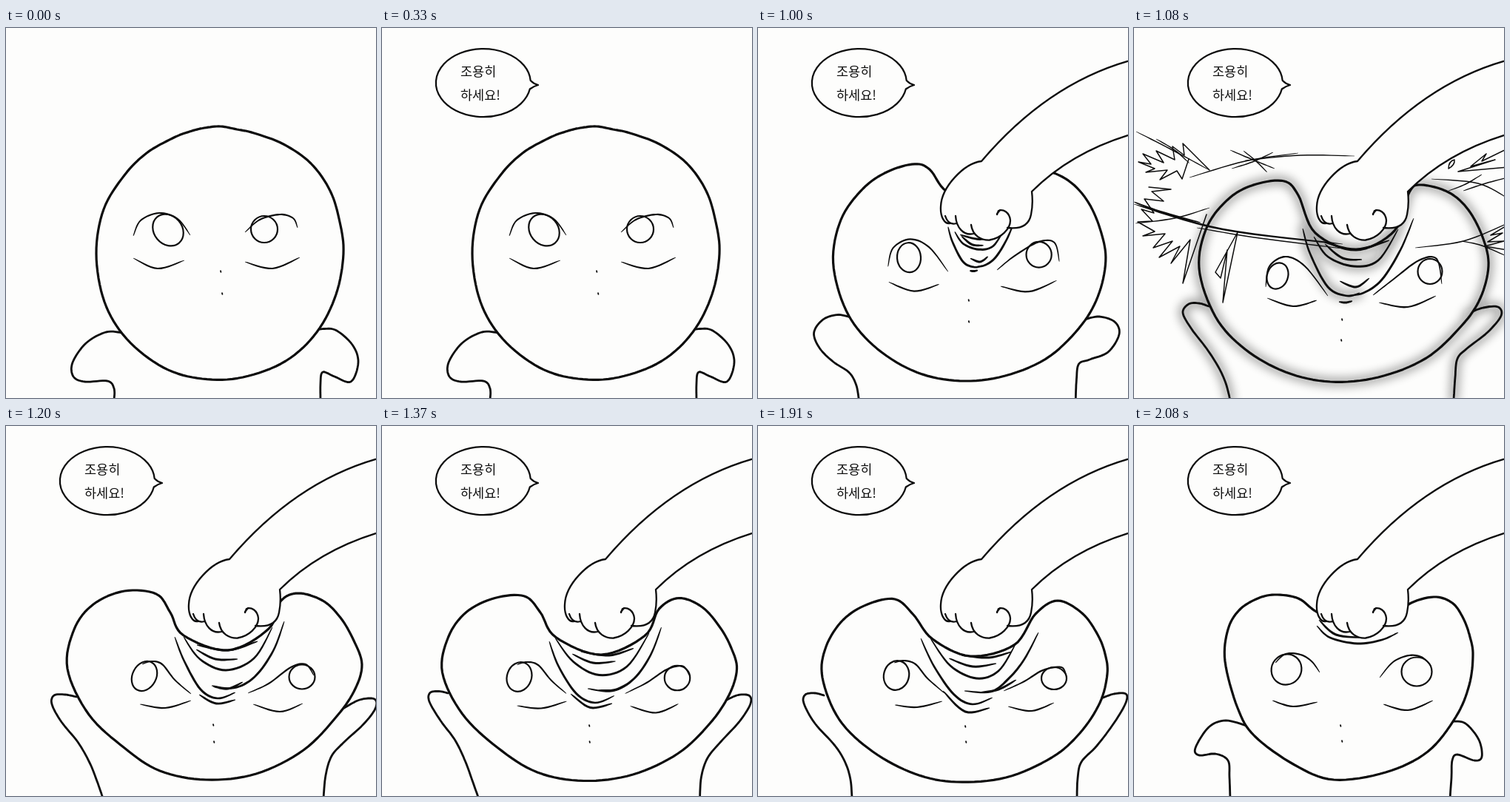
Recreate the animation shown at these times as an HTML page. Size 500x500 px, loop 3 s.

```html
<!DOCTYPE html>
<html lang="ko">
<head>
<meta charset="utf-8">
<style>
  html, body { margin: 0; width: 100%; height: 100%; overflow: hidden; background: #fdfdfc; }
  svg { display: block; width: 100vw; height: 100vh; }
  text { font: 500 17.5px "Noto Sans CJK KR", "Noto Sans CJK", "Noto Sans CJK JP", sans-serif; fill: #111; }
</style>
</head>
<body>
<svg id="stage" viewBox="0 0 500 500"></svg>
<script>
const INK = '#0d0d0d', PAPER = '#fdfdfc', LOOP = 3000;
const stage = document.getElementById('stage');

// Each part lists its guide points in six poses.
const POSES = ['rest', 'hit', 'sag', 'low', 'lift', 'end'];
const hidden = n => Array(n).fill('300,265').join(' ');

const PARTS = {
  head: [
    '225,149 248,140 268,135 290,133 312,137 335,142 375,157 412,183 438,220 451,262 456,305 446,360 420,411 378,450 320,472 265,474 213,459 163,420 133,370 122,305 132,245 160,199 190,169',
    '203,207 222,226 245,277 300,300 352,274 372,222 388,212 425,222 452,246 472,285 479,322 468,365 443,402 395,446 330,472 265,478 205,465 150,434 110,390 88,325 99,268 130,229 165,211',
    '203,227 222,252 240,283 300,303 355,274 371,237 395,226 428,236 452,259 470,290 481,322 472,355 448,391 402,438 338,470 270,478 208,466 160,435 112,390 83,328 92,275 118,241 160,223',
    '182,233 206,252 230,288 292,315 355,293 378,257 408,239 438,254 462,286 474,310 478,335 466,372 438,413 398,447 340,472 275,481 212,470 152,434 105,388 80,338 87,296 110,262 145,242',
    '185,234 210,255 236,288 287,311 346,296 375,254 405,236 438,253 459,282 469,308 472,335 462,374 435,415 397,448 335,475 268,481 212,470 155,440 110,397 87,340 92,298 115,262 148,241',
    '190,228 222,233 248,252 300,278 350,264 371,241 405,231 430,239 445,260 454,285 458,310 453,350 435,393 397,440 340,468 270,478 217,458 163,419 140,381 123,318 127,275 142,249 165,234'
  ],
  armL: [
    '158,412 135,411 108,426 90,452 91,471 107,478 137,477 146,487 146,503',
    '101,376 88,372 74,373 66,385 78,407 98,433 114,458 124,480 130,503',
    '95,366 80,363 65,364 62,376 75,400 97,427 113,455 123,480 131,503',
    '83,356 74,354 65,357 66,369 83,396 101,423 112,451 121,478 130,503',
    '89,364 77,361 64,363 62,375 77,402 104,432 118,455 125,478 127,503',
    '152,405 124,398 101,407 83,435 88,445 110,443 127,452 129,475 130,503'
  ],
  armR: [
    '424,407 445,408 468,428 476,452 466,478 444,471 428,465 425,480 425,503',
    '450,386 472,378 492,377 496,389 478,411 450,433 437,447 434,472 432,503',
    '457,381 478,370 498,369 499,382 483,403 457,427 440,446 432,472 429,503',
    '473,360 485,357 495,360 496,371 482,397 459,426 440,451 431,476 430,503',
    '464,368 481,362 497,362 497,374 482,400 458,432 437,454 432,476 431,503',
    '430,399 448,402 466,424 470,447 460,452 437,444 430,452 429,475 427,503'
  ],
  lidL: [
    '172,281 182,260 207,250 232,258 249,280',
    '178,350 183,322 205,309 231,322 262,362',
    '184,322 196,318 211,322 228,343 250,362',
    '181,323 195,320 211,324 229,344 248,361',
    '184,320 197,317 213,322 229,341 252,361',
    '191,320 205,308 225,309 240,318 251,333'
  ],
  lidR: [
    '323,276 343,259 370,252 388,257 394,270',
    '323,361 350,340 385,314 409,312 416,346',
    '327,361 355,348 385,326 405,322 416,337',
    '330,362 360,346 385,332 408,327 415,338',
    '332,358 360,345 385,330 410,326 417,339',
    '332,340 350,319 372,310 390,313 402,325'
  ],
  bagL: ['172,311 205,325 241,314', '180,365 215,376 247,368', '181,376 215,381 250,371',
    '184,380 215,382 249,373', '185,377 215,380 249,372', '187,371 215,379 248,373'],
  bagR: ['323,316 360,325 397,310', '331,371 370,377 408,362', '334,376 370,386 401,375',
    '337,381 370,389 400,376', '338,379 370,385 400,374', '337,376 370,384 404,371'],
  // cx, cy, rx, ry, tilt
  pupilL: ['219,273,19,23,-40', '194,335,14,18,20', '187,338,16,21,28',
    '184,340,17,19.5,12', '187,337,17,20,15', '206,329,20,21,40'],
  pupilR: ['349,272,18,18,0', '400,329,16.5,17,0', '400,339,17.5,16.5,0',
    '398,342,17,17,0', '400,341,17,15,0', '382,332,20.5,19.5,0'],
  dots: ['290,329 292,359', '281,394 280,422', '280,404 281,427',
    '280,406 280,427', '280,406 281,427', '279,405 281,426'],
  foldL: [hidden(5), '228,271 238,305 262,350 288,362 305,358', '228,285 241,318 263,356 286,368 310,360',
    '224,297 236,331 262,367 290,380 318,369', '220,287 238,325 265,363 290,376 317,367', hidden(5)],
  foldR: [hidden(5), '378,257 360,300 335,340 310,358 285,362', '376,264 361,304 336,339 308,354 278,351',
    '379,280 365,315 345,344 315,362 278,359', '379,279 360,315 340,340 315,359 279,358', hidden(5)],
  foldMid: [hidden(5), '243,282 262,309 297,322 330,314 357,272', '240,285 262,315 297,330 335,314 360,272',
    '228,288 255,322 290,343 327,336 362,288', '233,287 260,324 295,341 325,331 348,295',
    '247,270 265,286 302,294 335,289 357,279'],
  foldTop: [hidden(3), '258,292 282,311 308,313', '257,302 283,315 313,315',
    '257,314 287,325 318,321', '258,314 290,325 322,321', '250,262 273,282 312,286'],
  foldRim: [hidden(3), '255,289 300,299 345,287', '258,296 300,303 340,291',
    '280,314 314,317 340,310', '275,310 312,313 343,305', hidden(3)],
  foldSide: [hidden(3), '278,342 300,350 318,338', '280,352 300,355 320,346',
    '305,362 330,358 352,346', '300,360 325,356 349,343', hidden(3)],
  foldLow: [hidden(3), '277,370 286,371 295,369', '261,363 284,375 310,370',
    '249,361 279,386 312,380', '250,358 280,386 313,381', hidden(3)]
};
const nums = s => s.split(/[ ,]+/).map(Number);
for (const key in PARTS) PARTS[key] = PARTS[key].map(nums);

// start, pose, next pose, blend, fist drop (null = absent), impact strength
const STEPS = [
  [0, 'rest', 'rest', 0, null, 0],
  [330, 'rest', 'rest', 0, null, 0],
  [910, 'rest', 'rest', 0, 0, 0],
  [950, 'rest', 'rest', 0, 95, 0],
  [990, 'rest', 'hit', 0.6, 190, 0],
  [1040, 'rest', 'hit', 0.92, 190, 0.8],
  [1080, 'hit', 'hit', 0, 190, 1],
  [1120, 'hit', 'sag', 0.4, 190, 0.6],
  [1160, 'hit', 'sag', 0.75, 190, 0.25],
  [1200, 'sag', 'sag', 0, 190, 0],
  [1290, 'sag', 'low', 0.25, 190, 0],
  [1370, 'sag', 'low', 0.5, 190, 0],
  [1540, 'low', 'low', 0, 190, 0],
  [1910, 'lift', 'lift', 0, 190, 0],
  [1950, 'lift', 'end', 0.2, 190, 0],
  [1990, 'lift', 'end', 0.5, 190, 0],
  [2040, 'lift', 'end', 0.8, 190, 0],
  [2080, 'end', 'end', 0, 190, 0]
];

const pairs = a => a.reduce((out, v, i) => (i % 2 ? out[out.length - 1].push(v) : out.push([v]), out), []);

function spline(points, closed) {
  const n = points.length, out = [];
  const at = i => closed ? points[(i + n) % n] : points[Math.max(0, Math.min(n - 1, i))];
  const spans = closed ? n : n - 1;
  for (let i = 0; i < spans; i++) {
    const [a, b, c, d] = [at(i - 1), at(i), at(i + 1), at(i + 2)];
    for (let s = 0; s < 8; s++) {
      const u = s / 8;
      out.push([0, 1].map(k => b[k] + u * (c[k] - a[k]) / 2
        + u * u * (a[k] - 2.5 * b[k] + 2 * c[k] - d[k] / 2)
        + u * u * u * (1.5 * (b[k] - c[k]) + (d[k] - a[k]) / 2)));
    }
  }
  if (!closed) out.push(points[n - 1]);
  return out;
}

const trace = (pts, closed) => 'M' + pts.map(p => p.map(v => v.toFixed(1)).join(' ')).join('L') + (closed ? 'Z' : '');
const line = (d, width, fill = 'none') =>
  `<path d="${d}" fill="${fill}" stroke="${INK}" stroke-width="${width}" stroke-linecap="round" stroke-linejoin="round"/>`;

// A curve that thins out at both ends.
function brush(flat, width) {
  const pts = spline(pairs(flat)), last = pts.length - 1;
  const left = [], right = [];
  pts.forEach(([x, y], i) => {
    const p = pts[Math.max(0, i - 1)], q = pts[Math.min(last, i + 1)];
    const dx = q[0] - p[0], dy = q[1] - p[1], len = Math.hypot(dx, dy) || 1;
    const h = len < 1e-6 ? 0 : width / 2 * (0.25 + 0.75 * Math.sqrt(Math.sin(Math.PI * i / last) + 1e-9));
    left.push([x - dy / len * h, y + dx / len * h]);
    right.unshift([x + dy / len * h, y - dx / len * h]);
  });
  return `<path d="${trace(left.concat(right), true)}" fill="${INK}"/>`;
}
const strokes = (list, width) => list.map(s => brush(nums(s), width)).join('');
const scribbles = list => list.map(s => line('M' + s, 1.5)).join('');

const BUBBLE = line('M200.7 71A64 46 0 1 0 199.8 82.5Q204 79 211 77Q205 75.5 200.7 71Z', 2.3, PAPER)
  + '<text x="106" y="65">조용히</text><text x="106" y="97">하세요!</text>';

const FIST = line('M510 42C440 60 370 100 302 180C278 183 248 215 247 241Q247 259 256 265Q261 268 267 265'
    + 'Q273 278 290 278Q298 286 312 286.5Q327 285 337 270Q362 272 367 259Q372 240 370 221C405 186 450 159 510 142Z', 0, PAPER)
  + line('M510 42C440 60 370 100 302 180C278 183 248 215 247 241C246 255 252 265 259 264M253 254Q257 267 268 264'
    + 'M267 254C268 270 278 281 291 278M288 266C290 281 302 287 313 286.5C328 284 341 272 341 260C340 249 331 244 325 247L323 252'
    + 'M327 246L323 251M337 270C354 272 366 268 369 252Q372 238 370 221C405 186 450 159 510 142', 2.3);

const FALLING = line('M510-150C430-120 340-70 290-45C262-30 250-12 248 0C243 30 245 65 262 84C280 101 325 102 338 82'
    + 'L340 92L347 96L351 86C368 78 379 55 373 28C383 18 395 8 408 0Q450-28 510-50Z', 0, PAPER)
  + line('M510-150C430-120 340-70 290-45C262-30 250-12 248 0C243 30 245 65 262 84C280 101 332 103 339 80'
    + 'M352 85C369 77 379 55 373 28C383 18 395 8 408 0Q450-28 510-50M338 84Q337 93 346 95M349 94Q349 88 353 82', 2.2)
  + line('M341 94L350 94', 3)
  + strokes(['266,15 268,60 271,111', '320,12 330,48 338,82', '297,53 306,83 314,110', '333,36 341,49 345,66',
      '367,45 369,72 371,94', '275,80 274,90 273,97', '282,84 283,90 285,96', '301,80 303,93 305,105'], 1.6)
  + line('M335 45L338 68M279 86L280 94', 0.8);

const IMPACT = scribbles([
    '102 192L66 156L68 172L52 160L55 178L30 166L40 182L12 170L23 184L6 181L28 190L16 195L45 192L35 205L58 193L65 204L74 177',
    '20 215L50 218L24 221L40 234L14 231L27 250L10 245L25 261L5 262L28 275L12 281L42 278L26 297L52 288L34 310L62 295L50 318L76 286L66 345L98 252',
    '140 276L110 330L117 338L126 300L120 371L140 276',
    '505 163L470 180L476 170L455 187L488 178L438 194L505 188',
    '505 266L482 280L498 277L478 289L500 288L474 295L505 300',
    '425 190Q425 180 433 178Q434 185 425 190Z'
  ])
  + strokes(['0,238 120,272 282,292', '0,235 35,248 90,263'], 2.6)
  + strokes(['85,270 170,284 282,298', '75,202 150,180 222,169', '150,179 225,172 298,173', '3,140 50,164 102,192',
      '130,165 158,177 190,190', '148,166 165,180 180,195', '188,168 160,181 132,190', '2,264 55,257 102,243',
      '402,204 465,210 505,230', '425,220 448,211 470,198', '445,220 475,210 505,202',
      '380,297 445,288 505,264', '443,288 470,294 505,309', '30,150 55,165 75,183'], 1.6);

function drawPose(a, b, k, impact) {
  const ia = POSES.indexOf(a), ib = POSES.indexOf(b);
  const get = key => PARTS[key][ia].map((v, i) => v + (PARTS[key][ib][i] - v) * k);
  // The hands swing outwards as the head springs back.
  const swing = a === 'lift' ? 20 * Math.sin(Math.PI * k) : 0;
  const arm = (key, side) => trace(spline(pairs(get(key)).map(([x, y]) =>
    [x + side * swing * Math.max(0, Math.min(1, (500 - y) / 90)), y])));
  const pupil = key => {
    const [x, y, rx, ry, tilt] = get(key);
    return `<ellipse cx="${x}" cy="${y}" rx="${rx}" ry="${ry}" transform="rotate(${tilt} ${x} ${y})" fill="none" stroke="${INK}" stroke-width="2.2"/>`;
  };
  const head = trace(spline(pairs(get('head')), true), true);
  const arms = arm('armL', -1) + arm('armR', 1);
  let out = line(arms, 2.8) + line(head, 3.2, PAPER);
  if (impact) {
    const dent = trace(spline(pairs(get('foldMid')))) + trace(spline(pairs(get('foldL'))));
    out += `<g filter="url(#soft)" opacity="${0.42 * impact}">${line(head + arms + dent, 10)}</g>`;
  }
  for (const key of ['lidL', 'lidR', 'bagL', 'bagR']) out += brush(get(key), 2.3);
  out += pupil('pupilL') + pupil('pupilR');
  for (const [x, y] of pairs(get('dots'))) out += line(`M${x} ${y - 0.8}L${x + 0.4} ${y + 0.8}`, 1.8);
  for (const key in PARTS) if (key.startsWith('fold')) out += brush(get(key), 3);
  if (impact) out += `<g opacity="${Math.min(1, impact * 1.1)}">${IMPACT}</g>`;
  return out;
}

function drawStep([start, a, b, k, drop, impact]) {
  let out = '<defs><filter id="soft" x="-20%" y="-20%" width="140%" height="140%"><feGaussianBlur stdDeviation="7"/></filter></defs>'
    + `<rect width="500" height="500" fill="${PAPER}"/>` + drawPose(a, b, k, impact);
  if (drop !== null) out += drop < 190 ? `<g transform="translate(0 ${drop})">${FALLING}</g>` : FIST;
  return out + (start >= 330 ? BUBBLE : '');
}

let shown = null;
function render(time) {
  const t = time % LOOP;
  const step = STEPS.filter(s => s[0] <= t).pop();
  if (step !== shown) stage.innerHTML = drawStep(shown = step);
}

const began = performance.now();
function tick() {
  render(performance.now() - began);
  requestAnimationFrame(tick);
}
tick();
</script>
</body>
</html>
```
